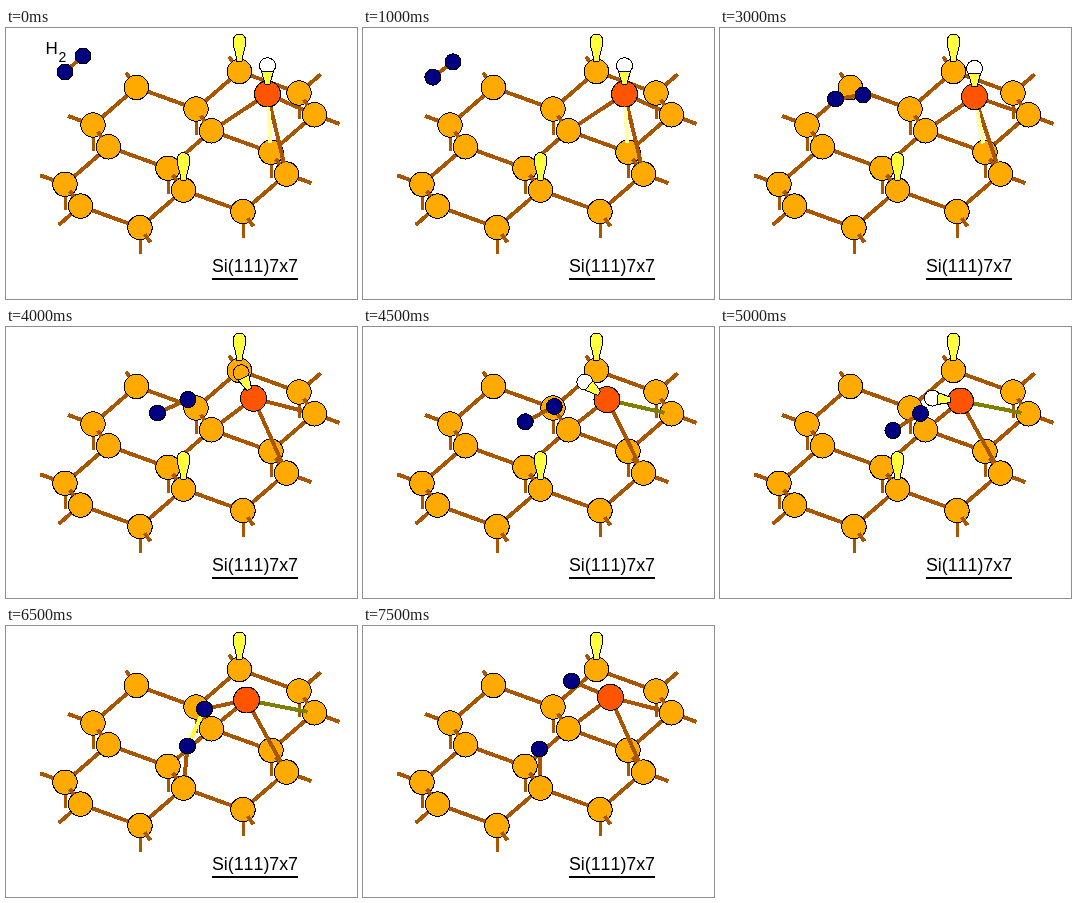
An HTML page that plays this animation: 351x271 px, repeating every 8000 ms.

```html
<!DOCTYPE html>
<html lang="en">
<head>
<meta charset="utf-8">
<title>Hydrogen on silicon</title>
<style>
html, body { margin: 0; width: 100%; height: 100%; overflow: hidden; background: #fff; }
svg { display: block; width: 351px; height: 271px; }
text { font-family: "Liberation Sans", Arial, sans-serif; font-kerning: none; }
</style>
</head>
<body>
<svg viewBox="0 0 351 271" shape-rendering="crispEdges">
  <g id="scene"></g>
  <text x="206" y="244" font-size="17.8">Si(111)7x7</text>
  <path d="M206 251H292" stroke="#000" stroke-width="2"/>
</svg>
<script>
const scene = document.getElementById("scene");
const BROWN = "#aa5500", ORANGE = "#ffaa00", RED = "#ff5500", NAVY = "#000080",
      YELLOW = "#ffff40", PALE = "#ffffaa", OLIVE = "#808000";

const mix = (a, b, t) => a + (b - a) * t;
const between = (p, q, t) => [mix(p[0], q[0], t), mix(p[1], q[1], t)];
const ramp = (x, from, to) => Math.min(1, Math.max(0, (x - from) / (to - from)));

// Buckled honeycomb: each upper site has a lower partner one step DOWN
const DOWN = [15.5, 21.8];
const upper = (i, j) => [87 + 103 * i + 75 * j, 97 - 16 * i + 43.3 * j];
const lower = (i, j) => upper(i, j).map((v, k) => v + DOWN[k]);
const hasUpper = (i, j) => j >= 0 && j <= 2 && i >= -(j > 0) && i <= 2 - j;
const hasLower = (i, j) => j >= -1 && j <= 1 && i >= -j && i <= Math.min(2, 2 - j);

// The three neighbours of an upper site, and how far a cut bond sticks out
const neighbours = [
  { di: 0, dj: 0, reach: 0.68 },
  { di: 1, dj: -1, reach: 0.5 },
  { di: 0, dj: -1, reach: 0.42 }
];

const line = (a, b, color = BROWN, width = 4) =>
  `<path d="M${a}L${b}" stroke="${color}" stroke-width="${width}"/>`;
const ball = ([x, y], r, fill) =>
  `<circle cx="${x}" cy="${y}" r="${r}" fill="${fill}" stroke="#000"/>`;

function yellowLobe([x, y]) {
  return `<path transform="translate(${x} ${y})" fill="${YELLOW}" stroke="#000"
    d="M-2.5 -10C-3 -18 -6.5 -24 -6.5 -30.5A6.5 7 0 0 1 6.5 -30.5C6.5 -24 3 -18 2.5 -10Z"/>`;
}

function tippedLobe([x, y], angle, tip) {
  return `<g transform="translate(${x} ${y}) rotate(${angle})" stroke="#000">
    <path fill="${tip}" d="M-6 -23A8 8 0 1 1 6 -23Z"/>
    <path fill="${YELLOW}" d="M-6 -23H6L2.5 -10H-2.5Z"/></g>`;
}

function buildLattice() {
  let back = "", front = "", balls = "";
  for (let j = -1; j <= 3; j++) for (let i = -2; i <= 3; i++) {
    const u = upper(i, j), isUpper = hasUpper(i, j);
    if (isUpper) {
      back += line(u, [u[0], u[1] + 26], BROWN, 3);
      balls += ball(u, 12.2, ORANGE);
      front += line(between(u, lower(i, j), 0.3), between(u, lower(i, j), 0.55));
    }
    if (hasLower(i, j)) balls += ball(lower(i, j), 12.2, ORANGE);
    for (const { di, dj, reach } of neighbours) {
      const l = lower(i + di, j + dj), isLower = hasLower(i + di, j + dj);
      if (isUpper && isLower) back += line(u, l);
      else if (isUpper) back += line(u, between(u, l, reach));
      else if (isLower) back += line(l, between(l, u, reach));
    }
  }
  return { back, atoms: balls + front };
}
const lattice = buildLattice();

// Way of the two hydrogen atoms; poses in between are interpolated
const path = [
  { at: 0, low: [59, 44], high: [77, 28] },
  { at: 3, low: [91.5, 59.5], high: [116, 45.5] },
  { at: 5, low: [115.5, 71], high: [143, 67] },
  { at: 7, low: [151.5, 86], high: [182, 72.5] },
  { at: 9, low: [173, 103.5], high: [200.5, 86.5] },
  { at: 11, low: [181, 120], high: [199, 84] },
  { at: 12, low: [181.5, 120], high: [198.5, 83] },
  { at: 14, low: [176.5, 123], high: [208.5, 55] }
];

function hydrogen(pose) {
  const k = Math.max(1, path.findIndex(p => p.at >= pose));
  const a = path[k - 1], b = path[k], t = ramp(pose, a.at, b.at);
  return [between(a.low, b.low, t), between(a.high, b.high, t)];
}

function render(pose) {
  const [low, high] = hydrogen(pose);
  const sink = ramp(pose, 3, 9) - ramp(pose, 12, 14) / 3;
  const red = between([261.5, 66], [240.5, 74], sink);
  const tilt = -84 * ramp(pose, 5, 9) ** 1.7;
  const flipped = pose >= 8 && pose <= 13;
  const site = lower(0, 1), right = lower(2, 0), base = lower(1, 1);
  let s = lattice.back + line(red, lower(1, 0));

  if (!flipped) s += line(red, right);
  if (pose >= 11) s += line(low, site);
  s += lattice.atoms;

  s += line(red, between(red, base, 0.86));
  if (pose < 7) s += line(red, between(red, upper(1, 1), 0.84), PALE);
  if (flipped) s += line(red, [right[0] - 7, right[1] - 1], OLIVE);
  if (pose >= 10) s += line(high, red, pose === 10 ? PALE : BROWN);
  s += ball(red, 13, RED);

  s += yellowLobe(lower(2, -1));
  if (pose < 11) s += yellowLobe(site);
  if (pose < 10) s += tippedLobe(red, tilt, pose === 7 ? ORANGE : "#fff");

  if (pose < 13) s += line(low, high, pose === 12 ? YELLOW : BROWN);
  s += ball(low, 8, NAVY) + ball(high, 8, NAVY);
  if (pose === 0) s += `<text x="39.5" y="26" font-size="17">H</text><text x="52.5" y="34" font-size="14">2</text>`;
  scene.innerHTML = s;
}

// The first pose is held for 1000 ms, the others for 500 ms
let shown = -1;
function tick() {
  const pose = Math.max(0, Math.floor(performance.now() % 8000 / 500) - 1);
  if (pose !== shown) render(shown = pose);
  requestAnimationFrame(tick);
}
tick();
</script>
</body>
</html>
```
